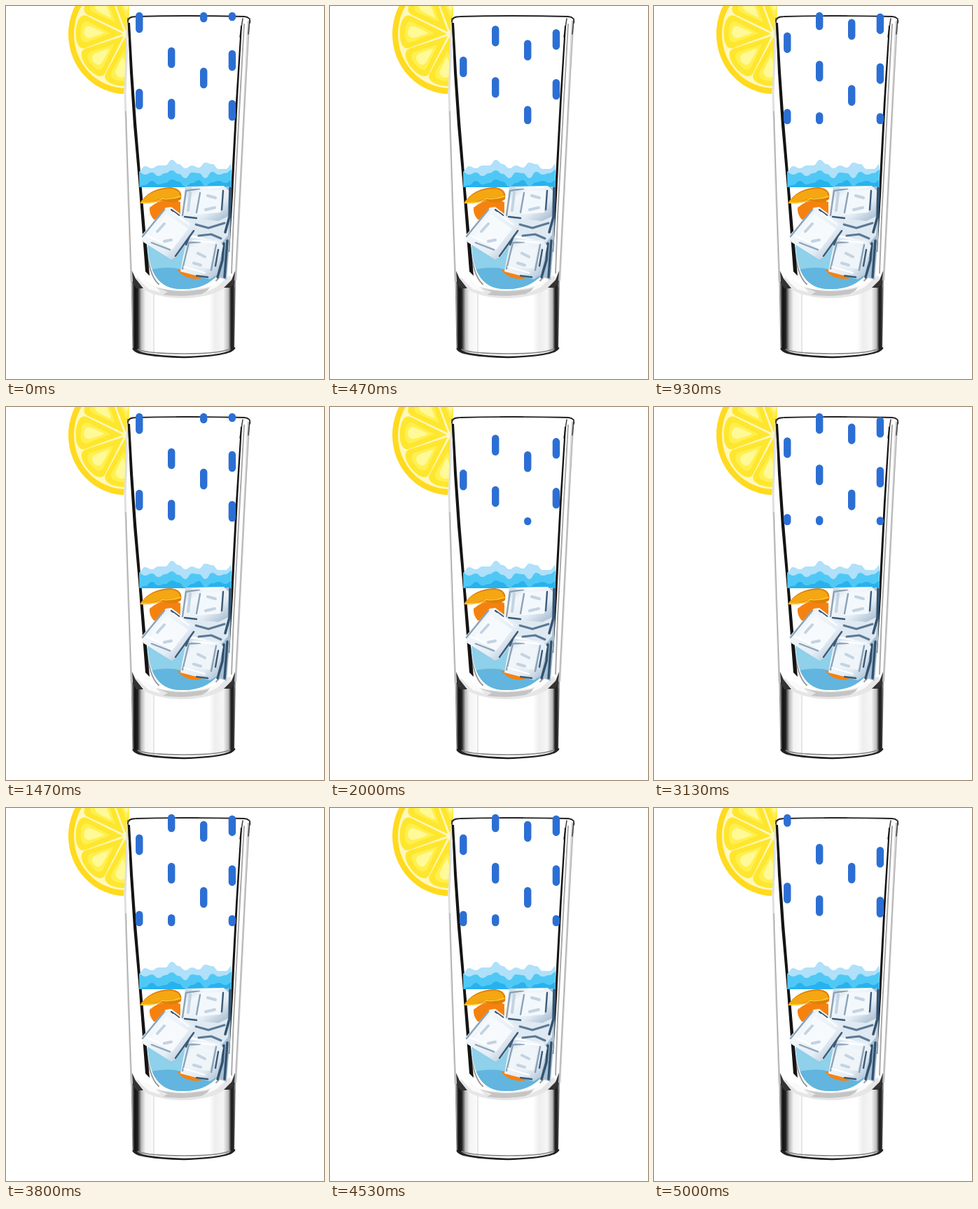
Recreate the animation shown at these times as an HTML page. Size 454 px wide and 531 px high, loop 5.03 s.

```html
<!DOCTYPE html>
<html lang="en">
<head>
<meta charset="utf-8">
<title>Filling glass</title>
<style>
  html, body { margin: 0; width: 100%; height: 100%; overflow: hidden; background: #fff; }
  svg { display: block; }
  #drops { stroke: #2c6fd4; stroke-width: 10.4; stroke-linecap: round; }
  .line { fill: none; stroke-linecap: round; stroke-linejoin: round; }
</style>
</head>
<body>
<svg width="454" height="531" viewBox="0 0 454 531">
  <defs>
    <g id="segment">
      <path fill="#ffe62e" d="M4 0L57-22Q66-25 70-12Q73 0 70 12Q66 25 57 22Z"/>
      <path fill="#fff04f" d="M22 0L54-14Q62-16 64-6Q65 0 64 6Q62 16 54 14Z"/>
      <path fill="#fff998" d="M31 0Q36-3 51-8Q59-9 60 0Q59 9 51 8Q36 3 31 0Z"/>
    </g>
    <clipPath id="lemonEdge"><path d="M80 0H176L173 70L168 128H80Z"/></clipPath>
    <clipPath id="inside"><path d="M190 210H322L321 280H191Z"/></clipPath>
    <clipPath id="bowl"><path d="M202 338Q204 403 250 403Q284 404 303 382L300 340Z"/></clipPath>
    <linearGradient id="base">
      <stop offset="0" stop-color="#888"/>
      <stop offset=".025" stop-color="#111"/>
      <stop offset=".055" stop-color="#222"/>
      <stop offset=".09" stop-color="#bbb"/>
      <stop offset=".13" stop-color="#f4f4f4"/>
      <stop offset=".2" stop-color="#fafafa"/>
      <stop offset=".21" stop-color="#ddd"/>
      <stop offset=".22" stop-color="#fff"/>
      <stop offset=".74" stop-color="#fff"/>
      <stop offset=".8" stop-color="#eee"/>
      <stop offset=".88" stop-color="#f6f6f6"/>
      <stop offset=".93" stop-color="#bbb"/>
      <stop offset=".955" stop-color="#222"/>
      <stop offset=".975" stop-color="#222"/>
      <stop offset="1" stop-color="#999"/>
    </linearGradient>
    <linearGradient id="ice" x1="0" y1="0" x2="1" y2="1">
      <stop offset="0" stop-color="#bccddc"/>
      <stop offset=".3" stop-color="#f2f7fb"/>
      <stop offset=".65" stop-color="#e4edf5"/>
      <stop offset="1" stop-color="#9db5ca"/>
    </linearGradient>
  </defs>

  <!-- lemon -->
  <g clip-path="url(#lemonEdge)">
    <g transform="translate(171 40) scale(1 1.04)">
      <circle r="82" fill="#ffda1f"/>
      <circle r="74" fill="#fff8bd"/>
      <use href="#segment" transform="rotate(53)"/>
      <use href="#segment" transform="rotate(97)"/>
      <use href="#segment" transform="rotate(140)"/>
      <use href="#segment" transform="rotate(183)"/>
      <use href="#segment" transform="rotate(227)"/>
      <use href="#segment" transform="rotate(271)"/>
    </g>
  </g>

  <!-- glass -->
  <path fill="url(#base)" d="M180 392Q212 414 250 415Q292 414 328 390L326 488Q320 500 254 502Q188 501 181 489Z"/>
  <g class="line">
    <path stroke="#e0e0e0" stroke-width="3" d="M174 20L170 125L174 260L179 392"/>
    <path stroke="#999" d="M171 150L179 392L181 489"/>
    <path stroke="#d4d4d4" stroke-width="3" d="M346 22L339 170L328 390"/>
    <path stroke="#aaa" d="M348 20L340 150L327 400"/>
    <path stroke="#aaa" stroke-width="2" d="M340 26L333 150L325 300L322 380"/>
    <path stroke="#222" stroke-width="1.8" d="M174 22Q174 15 186 15Q260 13 340 15Q350 16 348 24"/>
    <path stroke="#444" stroke-width="1.6" d="M174 18L178 80M348 18L346 40M338 18L334 44"/>
    <path stroke="#999" stroke-width="2" d="M200 340Q204 384 218 396M318 340Q314 380 300 391"/>
    <path stroke="#222" stroke-width="2.6" d="M182 488Q188 498 254 500Q320 498 326 487"/>
    <path stroke="#888" stroke-width="1.4" d="M188 489Q204 495 254 495Q306 495 320 488"/>
  </g>
  <path fill="#141414" d="M174 24L177 24L181 94L186 165L193 250L200 330L205 384L199 378L189 248L182 170L177 95Z"/>
  <path fill="#141414" d="M335 28L337 28L331 130L324 270L319 350L317 350L322 245L328 135Z"/>
  <path fill="#e6e6e6" d="M187 386Q204 403 250 405Q302 403 319 383L324 392Q301 416 250 416Q203 415 181 392Z"/>
  <path fill="#c4c4c4" d="M213 400Q250 412 296 400L279 410Q250 415 224 411L231 407Z"/>
  <path fill="#333" d="M180 377L185 388L196 402L186 402L181 394ZM327 377L322 390L311 401L321 401L326 394Z"/>
  <path fill="#fafafa" d="M190 390L204 403L221 408L214 400L201 391ZM313 389L301 400L286 407L293 398Z"/>

  <!-- drink -->
  <g id="waves" clip-path="url(#inside)"></g>
  <g clip-path="url(#bowl)">
    <path fill="#8fd0ea" d="M195 330H320V410H195Z"/>
    <path fill="#62b5de" d="M195 379Q216 371 241 373Q265 379 286 374L320 370V410H195Z"/>
  </g>

  <!-- orange -->
  <path fill="#f5820f" d="M205 287Q224 270 249 279V304H211Q204 296 205 287Z"/>
  <path fill="#e07f0b" d="M191 281Q204 259 235 258Q253 260 250 275Q240 283 224 277Q205 282 191 281Z"/>
  <path fill="#f4a713" d="M193 278Q207 261 235 260Q249 262 248 271Q238 274 223 273Q207 281 193 280Z"/>
  <path class="line" stroke="#ffd02e" stroke-width="1.6" d="M193 280Q215 281 223 274Q236 276 249 271"/>
  <path fill="#f58212" d="M244 375L270 379L279 388Q256 391 244 375Z"/>

  <!-- ice -->
  <path fill="#a9c0d4" d="M314 257H322L320 330L315 390L299 384L302 335L309 301Z"/>
  <path fill="#dfe9f2" d="M249 301L319 300L317 326L308 337L264 326Z"/>
  <path class="line" stroke="#33536f" stroke-width="3.5" d="M320 259L319 300L313 322M302 386L309 362L311 338M316 334L312 386"/>
  <path class="line" stroke="#5b7a96" stroke-width="3" d="M271 311L289 316L312 309M275 327L293 325L307 331"/>
  <path fill="url(#ice)" d="M256 257L311 256L318 263L316 300L303 306L250 301Z"/>
  <path fill="#f3f8fc" d="M275 264L309 262L306 294L270 297Z"/>
  <path fill="url(#ice)" d="M258 329L304 334L310 341L301 383L291 389L249 378Z"/>
  <path fill="#f0f5f9" d="M263 342L296 343L291 374L258 370Z"/>
  <path fill="url(#ice)" d="M228 287L236 286L270 312L269 322L244 357L236 361L196 336L193 327Z"/>
  <path fill="#f7fafd" d="M229 296L260 317L237 347L205 328Z"/>
  <g class="line">
    <path stroke="#8ba3b8" stroke-width="2.4" d="M252 298L257 263L276 260M277 266L272 294M195 328L226 290M208 337L234 347M252 374L261 337L277 336M300 340L293 376"/>
    <path stroke="#3d5b77" stroke-width="2.4" d="M310 263L308 290M268 320L242 356M236 290L247 298M262 328L257 340M272 384L288 386M303 347L299 370M255 300L272 302"/>
    <path stroke="#c3d3e1" stroke-width="4" d="M263 266L260 291M288 270L299 273M285 290L298 287M216 321L226 310M226 335L236 333M274 352L284 357M268 366L278 369"/>
    <path stroke="#fff" stroke-width="2" d="M266 259L304 258M201 327L222 337M239 294L261 311M267 334L298 337M254 371L284 380"/>
  </g>

  <g id="drops"></g>
</svg>
<script>
const NS = "http://www.w3.org/2000/svg";
const add = (parent, tag, attrs) => {
  const el = document.createElementNS(NS, tag);
  for (const key in attrs) el.setAttribute(key, attrs[key]);
  return document.getElementById(parent).appendChild(el);
};

// Smooth crest through evenly spaced heights, closed at the given depth.
function wave(color, heights, depth) {
  const gap = 134 / (heights.length - 1);
  let d = `M189 ${heights[0]}`;
  heights.slice(1).forEach((y, i) => {
    const x = 189 + gap * i;
    d += `C${x + gap / 2} ${heights[i]} ${x + gap / 2} ${y} ${x + gap} ${y}`;
  });
  add("waves", "path", { fill: color, d: `${d}V${depth}H189Z` });
}
wave("#b0e0fa", [236, 228, 231, 227, 227, 219, 225, 231, 227, 230, 223, 225, 232, 232, 225], 258);
wave("#50c8f5", [236, 240, 237, 242, 238, 234, 239, 245, 237, 238, 245, 236, 240, 238, 233], 258);
wave("#27b2ee", [257, 255, 249, 254, 252, 247, 250, 257, 252, 248, 256, 251, 249, 252, 248], 258);

// Each stream is a dashed line whose dashes slide down one gap per cycle.
const TOP = 14, BOTTOM = 163, DASH = 19;
const streams = [
  { x: 190.3, start: 14, gap: 109 },
  { x: 236.2, start: 64, gap: 73.2 },
  { x: 282.2, start: 93, gap: 94 },
  { x: 322.9, start: 68, gap: 71 }
].map(s => ({ ...s, line: add("drops", "line", {
  x1: s.x, x2: s.x, y1: TOP, y2: BOTTOM, "stroke-dasharray": `${DASH} ${s.gap - DASH}`
}) }));

const LOOP = 5030;
function draw(now) {
  const tick = Math.floor((now % LOOP + 4) * 0.03);
  // 25 poses per second shown at 30 ticks; the last of 19 poses is skipped.
  const pose = Math.max(0, Math.ceil((tick - 1) * 5 / 6)) % 18;
  for (const { start, gap, line } of streams) {
    line.setAttribute("stroke-dashoffset", TOP - start - gap * pose / 19);
  }
  requestAnimationFrame(draw);
}
draw(performance.now());
</script>
</body>
</html>
```
